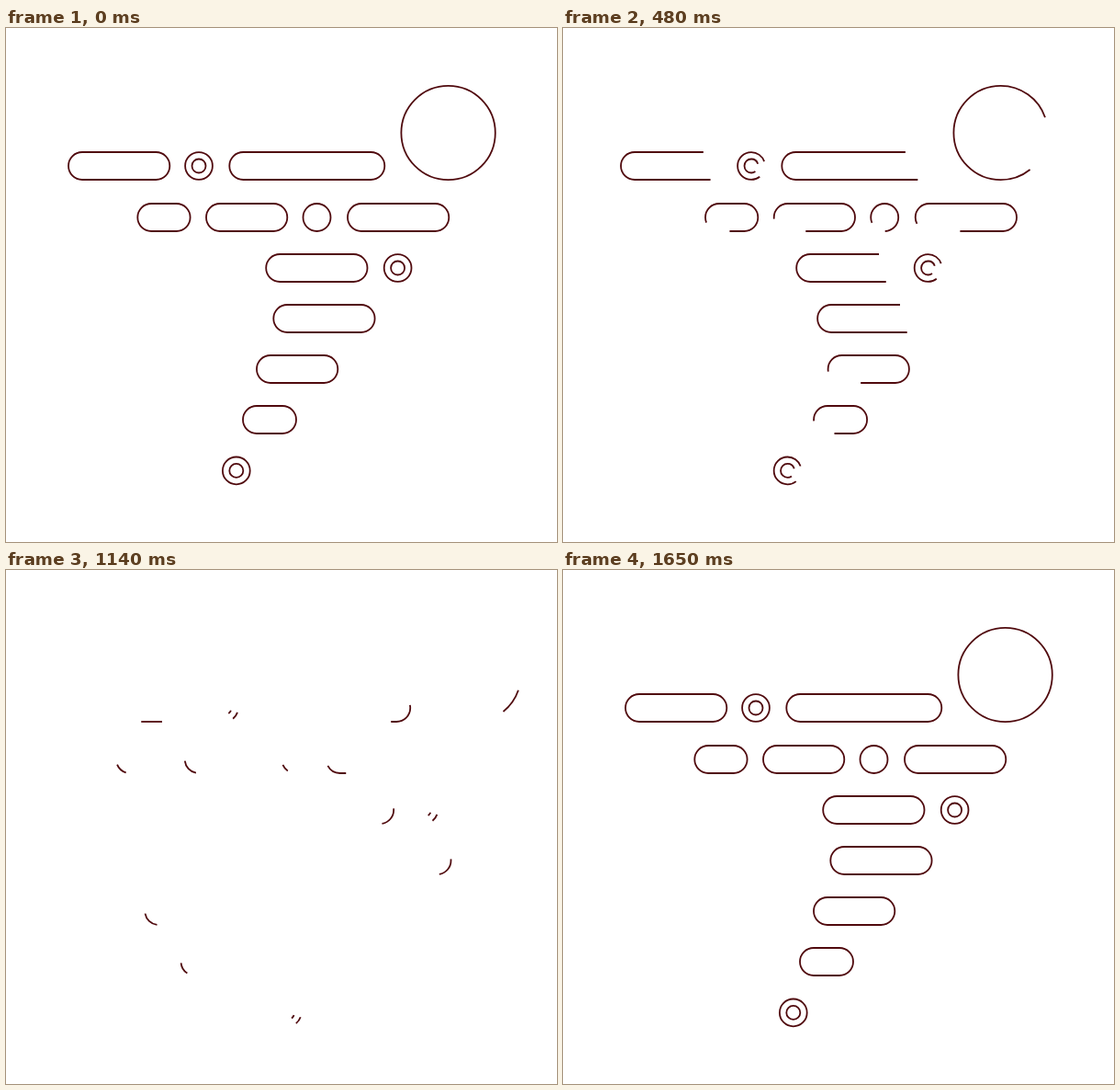
An HTML page with a canvas for the animation above (1920 ms loop, 600x559 px).

```html
<!DOCTYPE html>
<html lang="en">
<head>
<meta charset="utf-8">
<title>Tornado lines</title>
<style>
  html, body { margin: 0; width: 100%; height: 100%; overflow: hidden; background: #fff; }
  canvas { display: block; }
</style>
</head>
<body>
<canvas id="stage" width="600" height="559"></canvas>
<script>
const ctx = document.getElementById('stage').getContext('2d');
const LOOP = 1920, STEP = 30, MOVE_END = 1650, TRIM_MID = 825, SWAP = 870;

// Shapes are closed capsules. `start` is the distance (px) of the trim point,
// clockwise from the right end of the bottom edge; `shift` moves it on re-entry.
const pill = (x, w, start, shift = 0) => ({ x, w, r: 15, start, shift });
const circle = (cx, r, start) => ({ x: cx - r, w: 2 * r, r, start, shift: 0 });
const ring = cx => [circle(cx, 14.9, -10.5), circle(cx, 7.5, -5)];

// leave / enter: horizontal travel and the power that sharpens its easing.
const rows = [
  { y: 114, leave: [-29.5, 1], enter: [30, 1.25], shapes: [circle(481.6, 51.2, -35)] },
  { y: 150, leave: [-29.5, 1], enter: [30, 1.25],
    shapes: [pill(68, 110.3, -3, 47), ...ring(210), pill(243.3, 169, 6)] },
  { y: 206, leave: [94, 1.17], enter: [-27.5, 0.88],
    shapes: [pill(143.3, 57.3, 45), pill(218, 88.3, 80), circle(338.5, 15, 17.3), pill(372, 110.3, 96.5)] },
  { y: 261, leave: [-172, 1], enter: [32.5, 1], shapes: [pill(283.2, 110.3, -3), ...ring(426.6)] },
  { y: 316, leave: [-84, 1], enter: [94, 1], shapes: [pill(291.3, 110.3, -3)] },
  { y: 371, leave: [92.5, 1], enter: [-138, 1], shapes: [pill(273, 88.3, 79)] },
  { y: 426, leave: [89.5, 1], enter: [-76.5, 1], shapes: [pill(258, 58, 50)] },
  { y: 481.4, leave: [-37, 1], enter: [56, 2.7], shapes: ring(250.8) }
];

function bezier(x1, y1, x2, y2) {
  const at = (a, b, s) => 3 * (1 - s) ** 2 * s * a + 3 * (1 - s) * s * s * b + s ** 3;
  return x => {
    if (x <= 0) return 0;
    if (x >= 1) return 1;
    let low = 0, high = 1;
    for (let i = 0; i < 24; i++) {
      const mid = (low + high) / 2;
      if (at(x1, x2, mid) < x) low = mid; else high = mid;
    }
    return at(y1, y2, low);
  };
}

const easeLeave = bezier(0.55, 0.03, 0.7, 0.19);
const easeDraw = bezier(0.55, 0.03, 0.7, 0.315);
const easeEnter = bezier(0.8, 0, 0.4, 1);

// Strokes `visible` (0..1) of the outline, after or before its trim point.
function stroke({ x, w, r, start, shift }, y, dx, visible, entering) {
  const left = x + dx + r, right = x + dx + w - r;
  const length = 2 * (right - left) + 2 * Math.PI * r;
  const shown = Math.max(visible * length, 0.6);
  if (visible >= 1) {
    ctx.setLineDash([]);
  } else {
    ctx.setLineDash([shown, length - shown]);
    ctx.lineDashOffset = entering ? shown - start - shift : -start;
  }
  ctx.beginPath();
  ctx.moveTo(right, y + r);
  ctx.lineTo(left, y + r);
  ctx.arc(left, y, r, Math.PI / 2, Math.PI * 1.5);
  ctx.lineTo(right, y - r);
  ctx.arc(right, y, r, -Math.PI / 2, Math.PI / 2);
  ctx.stroke();
}

function drawLeaving(t) {
  const visible = 1 - easeLeave(t / TRIM_MID);
  const progress = easeLeave(t / SWAP);
  for (const { y, leave: [travel, power], shapes } of rows)
    for (const shape of shapes) stroke(shape, y, travel * progress ** power, visible, false);
}

function drawEntering(t) {
  const visible = easeDraw((t - TRIM_MID) / (MOVE_END - TRIM_MID));
  const progress = easeEnter((t - 840) / (MOVE_END - 840));
  for (const { y, enter: [travel, power], shapes } of rows)
    for (const shape of shapes) stroke(shape, y, travel * (1 - progress ** power), visible, true);
}

function draw(now) {
  const t = Math.floor((now % LOOP) / STEP) * STEP;
  ctx.clearRect(0, 0, 600, 559);
  ctx.strokeStyle = '#500a0e';
  ctx.lineWidth = 1.8;
  if (t <= SWAP) drawLeaving(t);
  if (t >= SWAP) drawEntering(t);
}

const begin = performance.now();
function tick() {
  draw(performance.now() - begin);
  requestAnimationFrame(tick);
}
tick();
</script>
</body>
</html>
```
